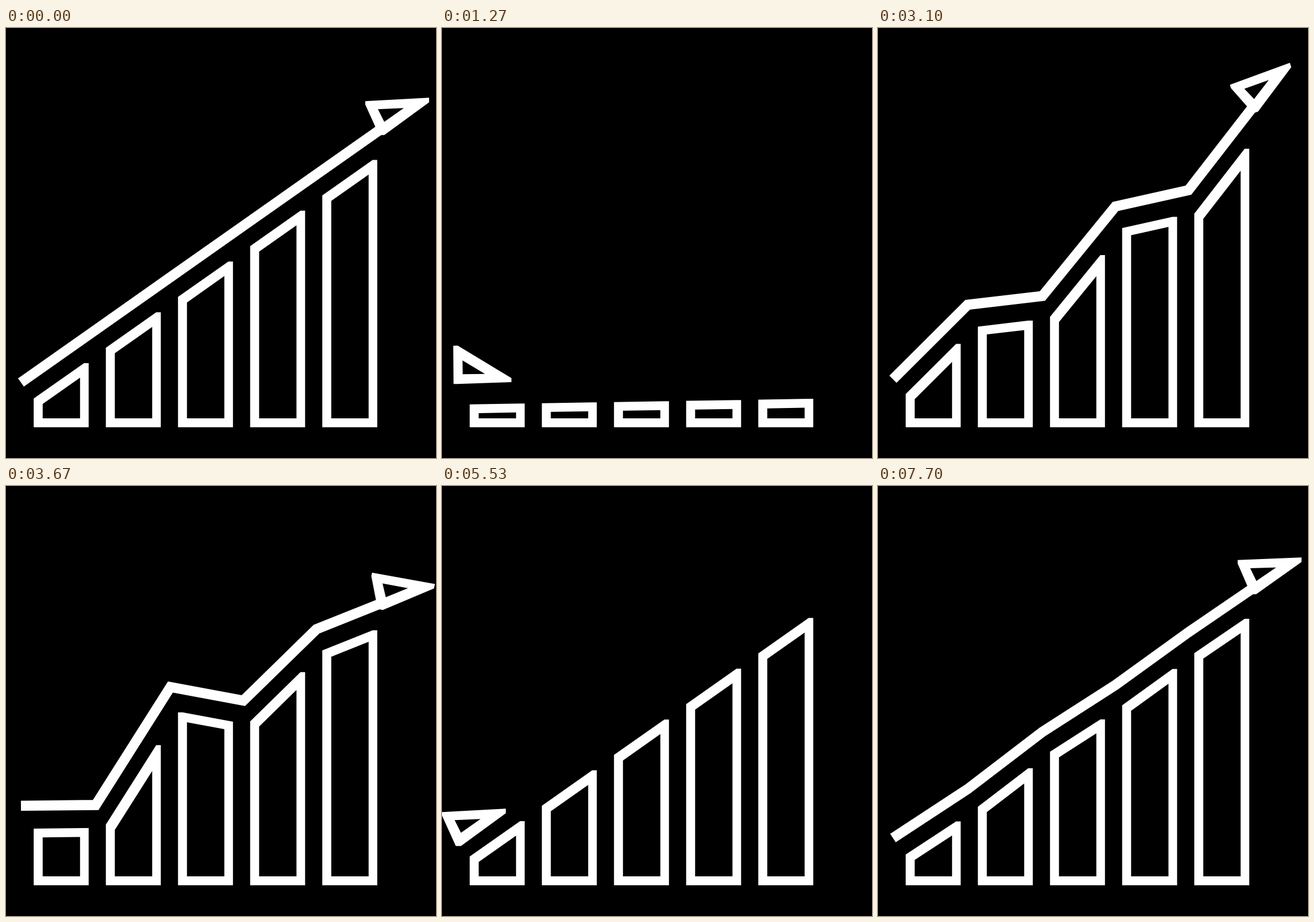
Animation, 748 px wide and 748 px high, one loop 7.73 s. Source, as an HTML page with a canvas:

```html
<!DOCTYPE html>
<html lang="en">
<head>
<meta charset="utf-8">
<title>Growth chart</title>
<style>
  html, body { margin: 0; width: 100%; height: 100%; overflow: hidden; background: #000; }
  canvas { display: block; }
</style>
</head>
<body>
<canvas id="stage" width="748" height="748"></canvas>
<script>
const ctx = document.getElementById('stage').getContext('2d');

const LOOP = 7730;
const CYCLE = 97;            // poses in the first of the two cycles
const LINE_WIDTH = 17.6;
const CUT = 8;               // width of the level cut on sharp bar corners
const START = { x: 28, y: 615.2 };
const SLOPE = -0.704;
const TRAVEL = 625;          // how far the arrow runs to the right

// Trend line joints, and their vertical shifts in the two jagged poses
const JOINTS = [28, 156, 286, 413, 540, 653];
const PEAK = [-5, -45, 35, -35, 28, -40];
const DIP = [-73.6, 37.2, -104.7, 36.4, -7, 35.8];

// Arrowhead outlines relative to the start of the line
const HEAD = {
  flat: {
    outer: [[-8, -63], [0, -63], [93, -5], [93, 2], [-2, 4], [-8, 4]],
    inner: [[8, -37], [47, -13], [8, -13]]
  },
  steep: {
    outer: [[-28, -42], [-28, -48], [83, -54], [83, -46], [5, 11], [-4, 11]],
    inner: [[-6, -34], [39, -36], [5, -12]]
  }
};

const clamp = p => Math.min(1, Math.max(0, p));
const smooth = p => { p = clamp(p); return p * p * (3 - 2 * p); };
const mix = (a, b, p) => a + (b - a) * p;

// Motion runs at 25 poses a second, shown on a 30 Hz grid
function poseIndex(ms) {
  const tick = Math.floor((ms + 5) * 0.03 + 1e-6);
  const n = Math.floor(tick * 5 / 6 + 1e-6) % 193;
  return n < CYCLE ? n : n - CYCLE;
}

function poseAt(n) {
  return {
    rise: n < 30 ? 1 - smooth(n / 20) : smooth((n - 30) / 11),
    reach: n < 30 ? 1 - smooth((n / 29) ** 0.82) : clamp((n - 41) / 19) ** 2,
    peak: n < 76 ? smooth((n - 65) / 5) : 1 - smooth((n - 76) / 13),
    dip: n < 89 ? smooth((n - 76) / 13) : 1 - smooth((n - 89) / 7)
  };
}

function addPolygon(points) {
  points.forEach(([x, y], i) => i ? ctx.lineTo(x, y) : ctx.moveTo(x, y));
  ctx.closePath();
}

function fillRing(outer, inner) {
  ctx.beginPath();
  addPolygon(outer);
  addPolygon(inner);
  ctx.fill('evenodd');
}

function drawBar(i, ys) {
  const slope = (ys[i + 1] - ys[i]) / (JOINTS[i + 1] - JOINTS[i]);
  const gap = 47.6 + 12.6 * slope * slope;
  const thick = Math.hypot(7.7, 9.6 * slope);
  const top = x => ys[i] + slope * (x - JOINTS[i]) + gap;
  const outer = x => top(x) - thick;
  const left = 48.2 + 125.5 * i, right = left + 95.6;
  const a = left + 15.6, b = right - 15;

  // The sharper upper corner is cut off level
  const cap = slope < 0
    ? [[left, outer(left)], [right - CUT, outer(right - CUT)], [right, outer(right - CUT)]]
    : [[left, outer(left + CUT)], [left + CUT, outer(left + CUT)], [right, outer(right)]];

  fillRing(
    [...cap, [right, 694.5], [left, 694.5]],
    [[a, top(a) + thick], [b, top(b) + thick], [b, 679], [a, 679]]
  );
}

function lineY(x, ys) {
  let i = 0;
  while (i < 4 && x > JOINTS[i + 1]) i++;
  return mix(ys[i], ys[i + 1], (x - JOINTS[i]) / (JOINTS[i + 1] - JOINTS[i]));
}

function drawLine(endX, ys) {
  if (endX < START.x + 2) return;
  ctx.beginPath();
  ctx.moveTo(26, lineY(26, ys));
  JOINTS.forEach((x, i) => { if (i && x < endX) ctx.lineTo(x, ys[i]); });
  ctx.lineTo(endX, lineY(endX, ys));
  ctx.stroke();
}

function drawHead(x, y, rise, turn) {
  const blend = part => HEAD.flat[part].map((p, i) =>
    p.map((v, k) => mix(v, HEAD.steep[part][i][k], rise)));
  ctx.save();
  ctx.translate(x, y);
  ctx.rotate(turn);
  fillRing(blend('outer'), blend('inner'));
  ctx.restore();
}

function draw(ms) {
  const { rise, reach, peak, dip } = poseAt(poseIndex(ms));
  const slope = SLOPE * rise;
  const ys = JOINTS.map((x, i) =>
    START.y + slope * (x - START.x) + PEAK[i] * peak + DIP[i] * dip);
  const endX = START.x + TRAVEL * reach;
  const endSlope = (ys[5] - ys[4]) / (JOINTS[5] - JOINTS[4]);

  ctx.fillStyle = '#000';
  ctx.fillRect(0, 0, 748, 748);
  ctx.fillStyle = ctx.strokeStyle = '#fff';
  ctx.lineWidth = LINE_WIDTH;
  ctx.lineJoin = 'miter';

  for (let i = 0; i < 5; i++) drawBar(i, ys);
  drawLine(endX, ys);
  drawHead(endX, lineY(endX, ys), rise, Math.atan(endSlope) - Math.atan(slope));
}

const begin = performance.now();
function tick() {
  draw((performance.now() - begin) % LOOP);
  requestAnimationFrame(tick);
}
tick();
</script>
</body>
</html>
```
